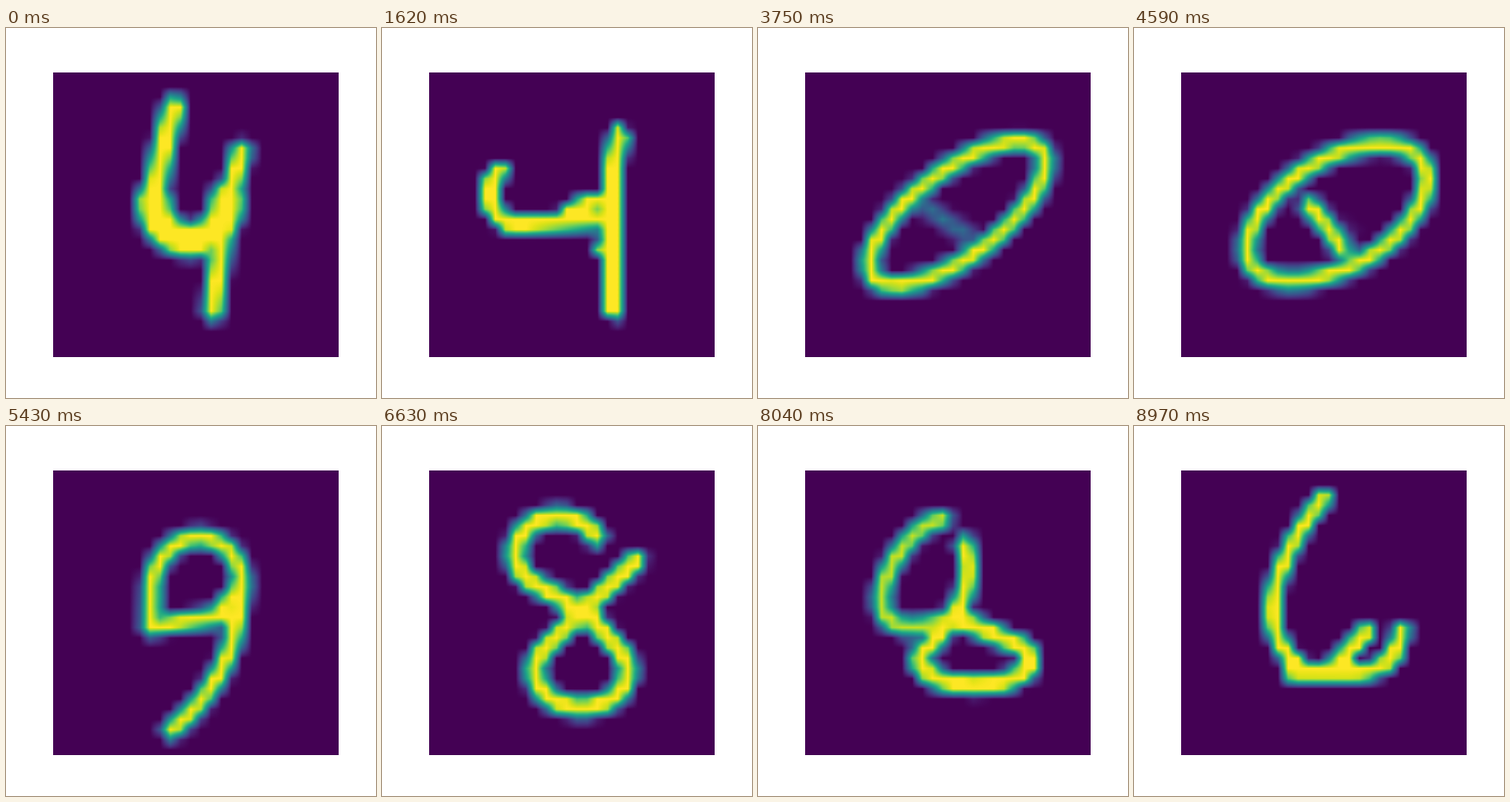
A matplotlib script for the animation above (9000 ms loop, 416 px wide and 416 px high).

```python
import numpy as np
import matplotlib.pyplot as plt
from matplotlib.animation import FuncAnimation

SIZE, GRID, SEG, FRAMES = 416, 28, 30, 300
LEFT, TOP, CELL = 53.04, 49.92, 320.32 / GRID


def arc(cx, cy, rx, ry, start, end, tilt=0):
    """Elliptic arc; angles in degrees, clockwise from the right."""
    a, r = np.radians(np.linspace(start, end, 60)), np.radians(tilt)
    x, y = rx * np.cos(a), ry * np.sin(a)
    return np.c_[cx + x * np.cos(r) - y * np.sin(r),
                 cy + x * np.sin(r) + y * np.cos(r)]


def chord(p):
    s = np.r_[0, np.cumsum(np.hypot(*np.diff(p, axis=0).T))]
    return s / s[-1]


def curve(*points):
    """Smooth polynomial through a few points."""
    p = np.array(points, float)
    fit = np.polyfit(chord(p), p, len(p) - 1)
    return np.vander(np.linspace(0, 1, 40), len(p)) @ fit


def path(*parts):
    return np.vstack([np.atleast_2d(p) for p in parts])


def stroke(p, core, outer, level, n=80):
    """Evenly spaced points, each with its pen radii and strength."""
    s, t = chord(p), np.linspace(0, 1, n)
    xy = [np.interp(t, s, p[:, k]) for k in (0, 1)]
    return np.c_[xy[0], xy[1], np.tile([core, outer, level], (n, 1))]


def digit(*paths, core=5, outer=16, level=1):
    pens = zip(*(np.broadcast_to(v, 3) for v in (core, outer, level)))
    return np.array([stroke(p, *pen) for p, pen in zip(paths, pens)])


def zero(ring, bar, **pen):
    line = curve((190, 203), (238, 236))
    return digit(ring, line, line, level=(1, bar, 0), **pen)


def eight(cross, upper, lower, arm, **pen):
    return digit(path(cross, upper), path(cross, lower, cross),
                 path(arm, cross), **pen)


bold_four = digit(
    curve((189, 90), (174, 150), (166, 200)),
    curve((264, 140), (246, 220), (233, 318)),
    arc(207, 195, 41, 44, 180, 0),
    core=(8, 6, 14), outer=(18, 17, 25))

square_four = digit(
    path(arc(147, 187, 25, 33, 230, 90), (262, 215)),
    curve((266, 122), (258, 210), (261, 318)),
    curve((210, 208), (258, 198), (250, 250)),
    core=(8, 9, 7), outer=14)

long_nine = digit(
    arc(200, 165, 75, 50, 310, 30),
    curve((290, 112), (270, 220), (228, 340)),
    curve((200, 215), (265, 195)))

round_zero = zero(arc(224, 212, 110, 78, 180, 540, -65), 0)
slant_zero = zero(arc(224, 209, 118, 48, 180, 540, -37), .4, core=(5, 1, 1))
slant_eight = zero(arc(230, 212, 118, 62, 180, 540, -30), 1)

nine = digit(
    path((163, 226), arc(214, 182, 50, 56, 170, 380, 15), (163, 226)),
    curve((262, 178), (250, 255), (186, 342)),
    curve((235, 215), (262, 183)))

open_eight = eight(
    (226, 208), arc(198, 144, 48, 41, 120, 332),
    arc(224, 276, 52, 41, 215, -35), (285, 152), core=7)

wide_eight = eight(
    (215, 205), arc(150, 145, 60, 45, 130, 320),
    arc(225, 270, 60, 50, 215, -35), (300, 130))

loop_eight = eight(
    (219, 215), curve((205, 221), (140, 205), (150, 158), (207, 106)),
    arc(244, 264, 62, 28, 215, -35), curve((232, 134), (236, 170), (223, 208)),
    core=(5, 7, 5), level=(.92, 1, 1))

six = digit(
    curve((195, 277), (158, 225), (170, 150), (213, 82)),
    path((178, 277), curve((245, 277), (288, 262), (300, 230))),
    curve((260, 233), (222, 274)),
    core=(6, 7, 7), outer=14)

# Two runs of morphs, with a hard cut between them.
RUNS = [
    [(0, bold_four), (1 + 24 / 29, square_four), (3, long_nine)],
    [(3, round_zero), (4 + 5 / 29, slant_zero), (5, slant_eight),
     (6 + 1 / 29, nine), (7 + 11 / 29, open_eight), (8, wide_eight),
     (8 + 28 / 29, loop_eight), (10, six)],
]

centre = (np.arange(GRID) + .5) * CELL
gx, gy = np.meshgrid(LEFT + centre, TOP + centre)


def pose(i):
    run = RUNS[i >= 3 * SEG]
    u = i // SEG + i % SEG / (SEG - 1)
    for (a, p), (b, q) in zip(run, run[1:]):
        if u <= b + 1e-9:
            return p + (q - p) * (u - a) / (b - a)
    return run[-1][1]


def image(i):
    out = np.zeros((GRID, GRID))
    for s in pose(i):
        x, y = s[:, 0], s[:, 1]
        core, outer, level = s[0, 2:]
        d = np.sqrt(((gx[..., None] - x) ** 2 + (gy[..., None] - y) ** 2).min(-1))
        out = np.maximum(out, level * np.clip((outer - d) / (outer - core), 0, 1))
    return out


fig, ax = plt.subplots(figsize=(SIZE / 100, SIZE / 100), dpi=100)
ax.axis("off")
pic = ax.imshow(image(0), cmap="viridis", vmin=0, vmax=1, interpolation="bilinear")


def update(i):
    pic.set_data(image(i))
    return [pic]


anim = FuncAnimation(fig, update, frames=FRAMES, interval=30, repeat=True,
                     repeat_delay=0)
plt.show()
```
